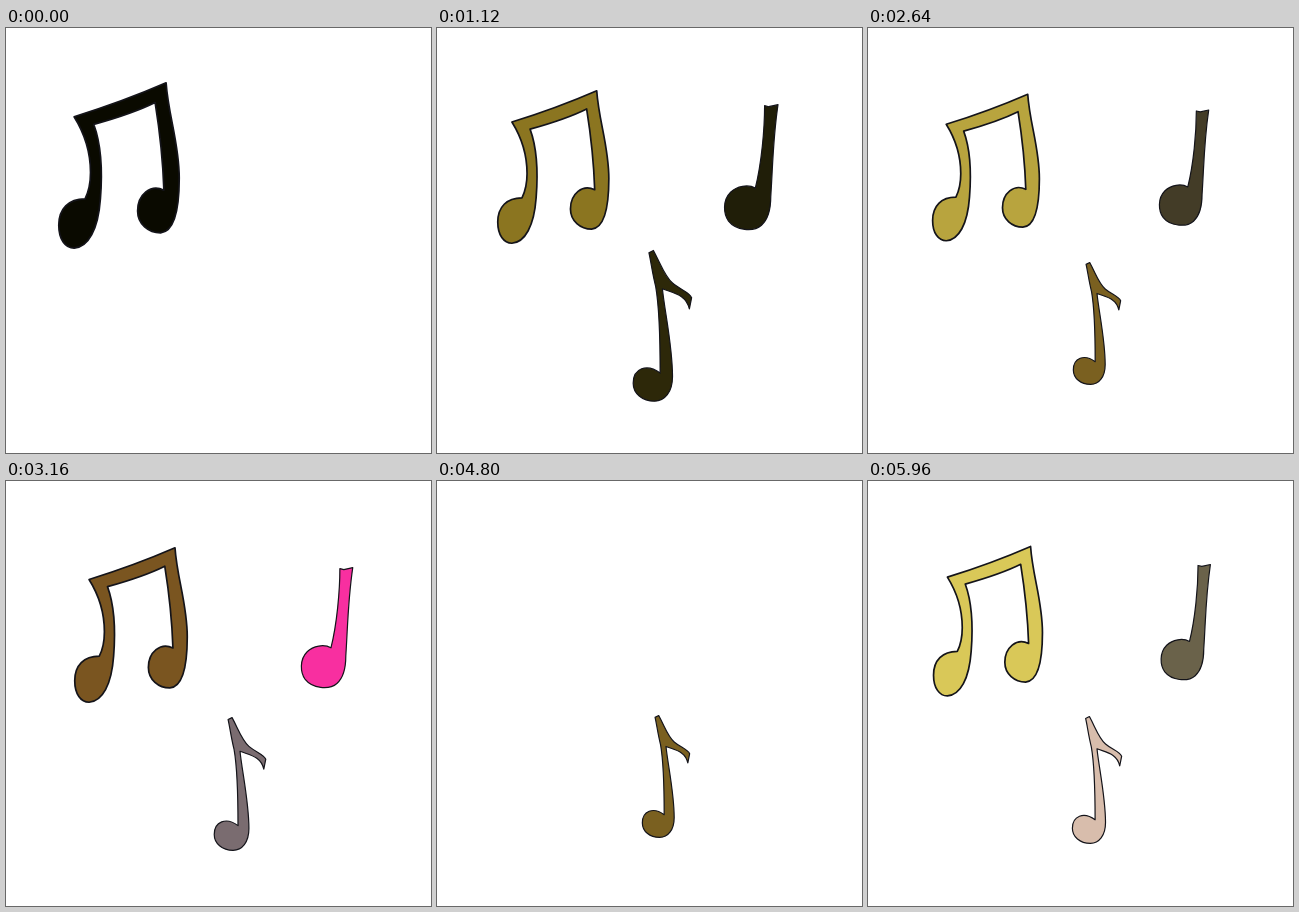
An HTML page for the animation above (6000 ms loop, 425 by 425 pixels).

```html
<!DOCTYPE html>
<html lang="en">
<head>
<meta charset="utf-8">
<title>Dancing notes</title>
<style>
  html, body { margin: 0; width: 100%; height: 100%; overflow: hidden; background: #fff; }
  svg { display: block; width: 100%; height: 100%; }
  path { stroke: #14141a; stroke-linejoin: round; vector-effect: non-scaling-stroke; }
</style>
</head>
<body>
<svg viewBox="0 0 425 425" id="stage"></svg>
<script>
const STEP = 40, STEPS = 150, BEAT = 9;

// Which notes sound on each beat.
const SCORE = "A B C ABC C B A ABC ABC ABC ABC A B C ABC ABC ABC".split(" ");

// Box: centre and outlined height of the path. Keys: step within the beat, centre x, centre y, height, colour.
const NOTES = {
  A: {
    box: [120, 140.5, 152.5],
    line: 1.7,
    path: `M163 65 C140 75 108 87 79 96 C89 112 94 129 94 147 C94 158 92 165 89 171
      C74 171 65 180 65 195 C65 208 71 216 79 216 C92 215 101 199 103 171
      C105 146 104 122 97 103 C115 98 137 91 153 83 C157 108 160 132 161 163
      C149 157 137 167 137 182 C137 194 147 202 158 202 C171 201 175 180 175 152
      C175 120 165 95 163 65 Z`,
    keys: [
      [0, 113, 137.5, 167, "#0a0a00"],
      [1, 116.3, 139, 154, "#8b7520"],
      [3, 118, 139.5, 148, "#b8a43e"],
      [5, 120, 140.2, 151, "#d9c858"],
      [7, 125, 144, 156, "#7a5520"],
      [8, 124, 143, 162, "#46300f"]
    ]
  },
  B: {
    box: [321, 146.5, 124.2],
    line: 1.2,
    path: `M334 87 C334 110 331 143 325 167 C318 163 307 165 301 171
      C293 179 294 192 299 199 C306 208 323 210 331 203 C339 196 340 185 340 175
      C342 145 342 120 347 86 L338 88 Z`,
    keys: [
      [0, 313, 139, 134, "#0a0a00"],
      [1, 314.2, 139, 128, "#201e08"],
      [3, 316, 139.5, 118, "#433c27"],
      [5, 317.7, 141, 118, "#6a624a"],
      [6, 318, 144.5, 121, "#4e2c3a"],
      [7, 321, 146.5, 123, "#f82fa0"],
      [8, 325.5, 148, 129, "#f82fa0"]
    ]
  },
  C: {
    box: [234, 303, 135.2],
    line: 1.2,
    path: `M222 238 L226 236 C233 249 236 259 243 265 C250 271 258 273 260 278
      L258 288 C255 275 244 274 234 270 C236 290 243 321 243 348
      C243 362 236 370 227 370 C216 370 208 363 208 354 C208 341 220 336 232 345
      C232 315 231 285 228 268 C225 256 224 247 222 238 Z`,
    keys: [
      [0, 223, 299.5, 163, "#0a0a00"],
      [1, 225.4, 297.8, 152, "#2d2809"],
      [3, 229, 295.5, 123, "#7a6020"],
      [5, 229, 299, 128, "#d8bdac"],
      [7, 234, 303, 134, "#7a6c70"],
      [8, 235, 304, 139, "#484044"]
    ]
  }
};

const stage = document.getElementById("stage");
for (const note of Object.values(NOTES)) {
  note.el = document.createElementNS("http://www.w3.org/2000/svg", "path");
  note.el.setAttribute("d", note.path);
  note.el.setAttribute("stroke-width", note.line);
  stage.append(note.el);
}

const mix = (a, b, t) => a + (b - a) * t;
const channels = hex => [1, 3, 5].map(i => parseInt(hex.slice(i, i + 2), 16));

function mixColor(a, b, t) {
  const end = channels(b);
  return `rgb(${channels(a).map((c, i) => Math.round(mix(c, end[i], t)))})`;
}

function poseAt(keys, phase) {
  const next = Math.max(1, keys.findIndex(key => key[0] >= phase));
  const a = keys[next - 1], b = keys[next];
  const t = (phase - a[0]) / (b[0] - a[0]);
  const [x, y, height] = [1, 2, 3].map(i => mix(a[i], b[i], t));
  return { x, y, height, color: mixColor(a[4], b[4], t) };
}

function draw(ms) {
  const step = Math.floor(ms / STEP) % STEPS;
  const playing = SCORE[Math.floor(step / BEAT)];
  for (const [name, { el, box, keys }] of Object.entries(NOTES)) {
    const visible = playing.includes(name);
    el.style.display = visible ? "" : "none";
    if (!visible) continue;
    const { x, y, height, color } = poseAt(keys, step % BEAT);
    el.setAttribute("fill", color);
    el.setAttribute("transform",
      `translate(${x} ${y}) scale(${height / box[2]}) translate(${-box[0]} ${-box[1]})`);
  }
}

const start = performance.now();
function tick() {
  draw(performance.now() - start);
  requestAnimationFrame(tick);
}
tick();
</script>
</body>
</html>
```
